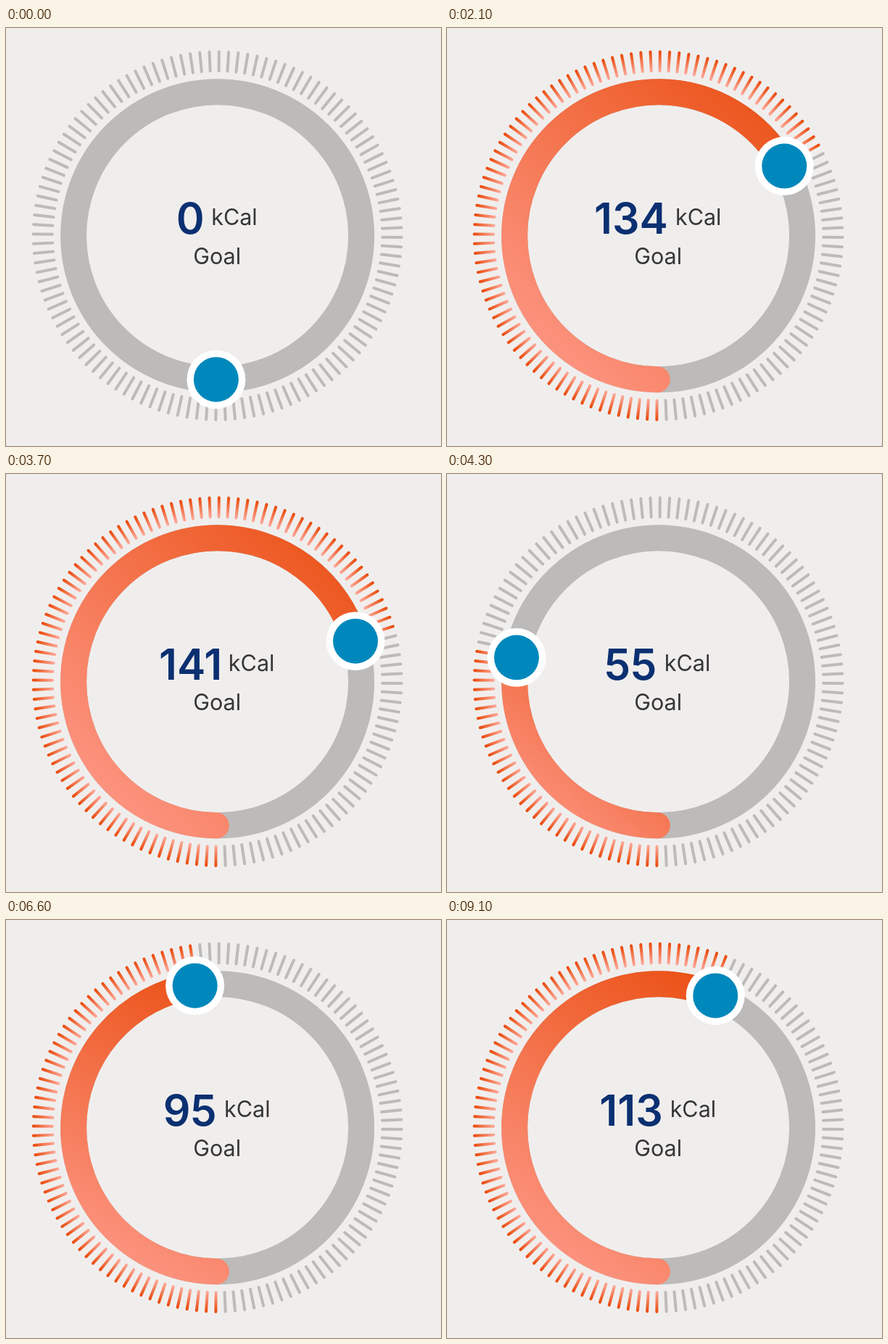
These frames come from a looping animation (600 px wide and 577 px high, 9200 ms). An HTML page with a canvas:

```html
<!DOCTYPE html>
<html lang="en">
<head>
<meta charset="utf-8">
<title>Calorie goal dial</title>
<style>
  html, body { margin: 0; width: 100%; height: 100%; overflow: hidden; background: #f0eeed; }
  canvas { display: block; }
</style>
</head>
<body>
<canvas id="dial" width="600" height="577"></canvas>
<script>
const ctx = document.getElementById('dial').getContext('2d');

const LOOP = 9200, STEP = 100, MAX = 200, TICKS = 120;
const CX = 291.6, CY = 286.7, RADIUS = 198.5, BAND = 36;
const START = 0.5, SWEEP = 359;
const FONT = 'Inter, Roboto, sans-serif';
const GREY = '#bcbbba', ORANGE = '#ea4d0f';

// Dragged value over time: [ms, kCal]
const KEYS = [
  [1100, 0], [1600, 57], [2100, 134], [2700, 191], [3100, 200], [3700, 141],
  [4100, 81], [4900, 2], [5800, 2], [6600, 95], [6800, 107], [7300, 113]
];

const slope = i => (KEYS[i + 1][1] - KEYS[i][1]) / (KEYS[i + 1][0] - KEYS[i][0]);

// Monotone tangents, so the drag never overshoots a key
function tangent(i) {
  if (i === 0 || i === KEYS.length - 1) return 0;
  const a = slope(i - 1), b = slope(i);
  return a * b <= 0 ? 0 : 2 * a * b / (a + b);
}

function valueAt(t) {
  if (t <= KEYS[0][0]) return KEYS[0][1];
  const i = KEYS.findIndex(key => key[0] >= t) - 1;
  if (i < 0) return KEYS[KEYS.length - 1][1];
  const [t0, v0] = KEYS[i], [t1, v1] = KEYS[i + 1];
  const d = t1 - t0, u = (t - t0) / d, w = 1 - u;
  return v0 * (1 + 2 * u) * w * w + v1 * u * u * (3 - 2 * u)
    + d * u * w * (tangent(i) * w - tangent(i + 1) * u);
}

// Angles run clockwise from the bottom of the dial, in degrees
const rad = deg => deg * Math.PI / 180;
const point = (deg, r) => [CX - r * Math.sin(rad(deg)), CY + r * Math.cos(rad(deg))];

function disc(x, y, r, color) {
  ctx.fillStyle = color;
  ctx.beginPath();
  ctx.arc(x, y, r, 0, 2 * Math.PI);
  ctx.fill();
}

function ring(from, to, color) {
  ctx.strokeStyle = color;
  ctx.lineWidth = BAND;
  ctx.beginPath();
  ctx.arc(CX, CY, RADIUS, rad(from + 90), rad(to + 90));
  ctx.stroke();
}

// Runs from the lower left to the upper right of the filled arc's bounds
function arcGradient(angle) {
  const sin = Math.sin(rad(angle)), cos = Math.cos(rad(angle)), pad = BAND / 2;
  const left = CX - RADIUS * (angle > 90 ? 1 : sin) - pad;
  const right = CX + RADIUS * (angle > 270 ? 1 : Math.max(0, -sin)) + pad;
  const top = CY + RADIUS * (angle > 180 ? -1 : cos) - pad;
  const gradient = ctx.createLinearGradient(left, CY + RADIUS + pad, right, top);
  gradient.addColorStop(0, '#ff9f92');
  gradient.addColorStop(1, ORANGE);
  return gradient;
}

const tickGradient = ctx.createRadialGradient(CX, CY, 226, CX, CY, 254);
tickGradient.addColorStop(0, '#fdaa9c');
tickGradient.addColorStop(1, ORANGE);

function drawTicks(value) {
  ctx.lineWidth = 4;
  for (let i = 0; i < TICKS; i++) {
    const angle = START + i * 360 / TICKS;
    const lit = value > 0 && i <= value / MAX * TICKS;
    ctx.strokeStyle = lit ? tickGradient : GREY;
    ctx.beginPath();
    ctx.moveTo(...point(angle, 227.5));
    ctx.lineTo(...point(angle, 254));
    ctx.stroke();
  }
}

function label(text, font, color) {
  ctx.font = font;
  const box = ctx.measureText(text);
  return {
    width: box.actualBoundingBoxLeft + box.actualBoundingBoxRight,
    draw(x, y) {
      ctx.font = font;
      ctx.fillStyle = color;
      ctx.fillText(text, x + box.actualBoundingBoxLeft, y);
    }
  };
}

function drawText(value) {
  const small = `400 30.5px ${FONT}`;
  const number = label(String(Math.round(value)), `600 59px ${FONT}`, '#0b3071');
  const unit = label('kCal', small, '#363636');
  const goal = label('Goal', small, '#363636');
  const gap = 14.5, middle = 291;
  const left = middle - (number.width + gap + unit.width) / 2;
  number.draw(left, 284);
  unit.draw(left + number.width + gap, 272);
  goal.draw(middle - goal.width / 2, 326);
}

function draw(now) {
  const time = Math.floor(now % LOOP / STEP) * STEP;
  const value = valueAt(time);
  const angle = START + value / MAX * SWEEP;
  const knob = point(angle, RADIUS);

  ctx.fillStyle = '#f0eeed';
  ctx.fillRect(0, 0, 600, 577);
  ctx.lineCap = 'round';
  drawTicks(value);
  ring(0, 360, GREY);
  if (value > 0) ring(START, angle, arcGradient(angle));
  disc(...knob, 40.5, '#fff');
  disc(...knob, 31, '#0088bc');
  drawText(value);
  requestAnimationFrame(draw);
}
requestAnimationFrame(draw);
</script>
</body>
</html>
```
